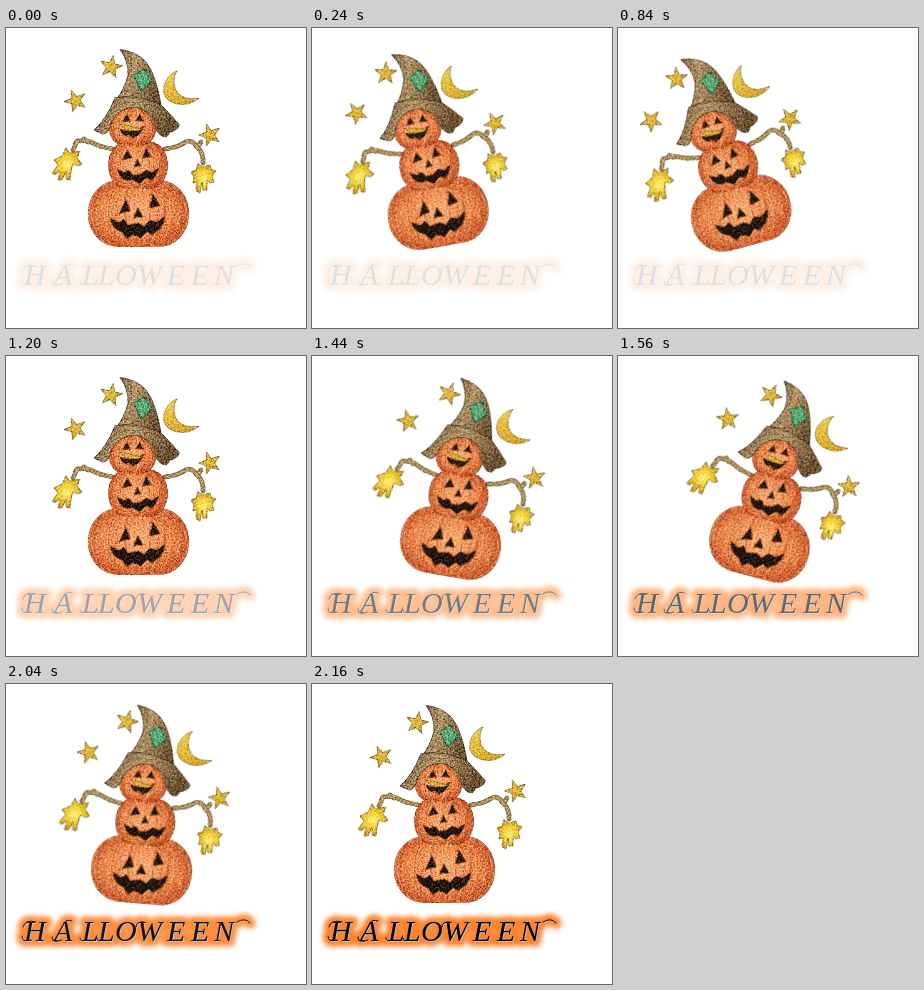
Write an HTML page that moves like this. It is 300 by 300 pixels and loops after 2280 ms.

```html
<!DOCTYPE html>
<html lang="en">
<head>
<meta charset="utf-8">
<title>Halloween</title>
<style>
html, body { margin: 0; width: 100%; height: 100%; overflow: hidden; background: #fff; }
svg { display: block; width: 100vw; height: 100vh; }
text { font: italic 30px "Liberation Serif", "Noto Serif", serif; stroke: none; }
#glow { filter: blur(2.4px); }
#glow use { stroke: #ff8128; stroke-width: 11px; }
</style>
</head>
<body>
<svg viewBox="0 0 300 300">
  <defs>
    <radialGradient id="skin" cx=".48" cy=".48" r=".58">
      <stop offset="0" stop-color="#f8b57c"/>
      <stop offset=".6" stop-color="#ec8d4e"/>
      <stop offset="1" stop-color="#c24a1c"/>
    </radialGradient>
    <linearGradient id="felt" x1="0" x2="1" y2=".3">
      <stop offset="0" stop-color="#735433"/>
      <stop offset=".45" stop-color="#b99a69"/>
      <stop offset="1" stop-color="#6d4f2d"/>
    </linearGradient>
    <linearGradient id="gold" x2="1" y2="1">
      <stop offset="0" stop-color="#f2d650"/>
      <stop offset="1" stop-color="#cf9c1e"/>
    </linearGradient>
    <radialGradient id="glove">
      <stop offset="0" stop-color="#fff08a"/>
      <stop offset=".5" stop-color="#f3d434"/>
      <stop offset="1" stop-color="#cfa01f"/>
    </radialGradient>
    <!-- crayon grain -->
    <filter id="grain" x="0" y="0" width="1" height="1" color-interpolation-filters="sRGB">
      <feTurbulence type="fractalNoise" baseFrequency=".6" numOctaves="2" seed="4"/>
      <feColorMatrix values="2 0 0 0 -.5  2 0 0 0 -.5  2 0 0 0 -.5  0 0 0 0 1"/>
      <feBlend in2="SourceGraphic" mode="soft-light"/>
      <feComposite in2="SourceAlpha" operator="in"/>
    </filter>
    <g id="letters">
      <text x="18 48 76 92 109 131 161 185 208" y="257">HALLOWEEN</text>
      <path d="M30 238Q19 235 17 243M25 256Q16 259 16 252M56 256Q46 260 46 253M66 237Q60 235 58 239M231 238Q239 233 244 239M80 256Q74 258 74 254M97 256Q91 258 91 254M138 238Q130 237 130 243" fill="none" stroke-linecap="round"/>
    </g>
  </defs>

  <g id="figure" stroke-linejoin="round" stroke-linecap="round"><g filter="url(#grain)">
    <g id="stars" fill="url(#gold)" stroke="#8d6c22" stroke-width=".9"></g>
    <path d="M171 43C163 46 156 55 158 65C161 77 181 81 193 70C181 73 172 68 169 60C167 53 168 47 171 43Z" fill="url(#gold)" stroke="#a57c1c" stroke-width=".8"/>

    <g fill="none">
      <g stroke="#715a34" stroke-width="4.8">
        <path id="arms" d="M107 121Q94 119 87 115T71 113L67 122M82 114L78 111M159 121Q170 120 178 115T191 119Q198 125 197 135M192 119L195 114"/>
      </g>
      <use href="#arms" stroke="#b8975f" stroke-width="3.2"/>
    </g>

    <g id="pumpkins"></g>

    <g fill="#21140e" stroke="#a95318" stroke-width=".8">
      <path d="M120 171L113 186L124 183ZM132 180L127 190L137 189ZM147 166L143 180L154 178Z"/>
      <path d="M104 190L113 194L118 191L122 197L132 195L138 198L144 192L151 194L159 188Q159 196 153 202L146 207L141 204L135 210L127 207L121 211L116 204Q106 202 104 190Z"/>
      <path d="M121 122L116 132L126 130ZM131 131L128 139L135 138ZM140 120L136 130L145 129Z"/>
      <path d="M111 141L118 144L123 142L127 147L135 146L140 142L146 144L153 140Q151 149 145 152L140 150L134 156L126 152L121 153Q113 150 111 141Z"/>
      <path d="M121 86L116 94L124 93ZM134 86L129 93L137 93Z"/>
      <path d="M114 101Q126 106 138 98Q135 108 127 110L123 107L119 108Q115 106 114 101Z"/>
    </g>
    <path d="M114 96L136 101Q128 105 119 101Z" fill="#e8b63a" stroke="#936022" stroke-width=".8"/>

    <g fill="url(#felt)" stroke="#4d3a22" stroke-width="1">
      <path d="M108 75Q118 62 122 48Q123 33 114 21.500Q130 23 140 34Q150 46 156 82Q132 68 108 75Z"/>
      <path d="M109 70Q131 65 156 78Q163 85 173 96Q173 102 164 104Q161 111 156 108Q149 104 147 92Q142 82 129 79Q112 80 105 95Q103 106 97 106L88 102Q100 92 109 70Z"/>
    </g>
    <path fill="none" stroke="#4d3a22" stroke-width=".8" opacity=".55" d="M124 29Q130 50 118 69M131 34Q146 52 149 73M125 57L127 69M109 76Q132 70 158 82M105 83L94 102M154 86Q162 93 163 103M148 85L154 101"/>
    <path d="M128 47L138 41L146 53L135 63Z" fill="#5fab78" stroke="#276a43" stroke-width="1.1"/>

    <g fill="url(#glove)" stroke="#96751c" stroke-width=".8">
      <path d="M60 120L64 125L74 123L71 130L76 136L72 138L67 136L65 143L64 152L60 151L60 143L56 152L52 152L54 143L49 147L46 145L52 137L48 132L56 128Z"/>
      <path d="M192 136L197 139L204 137L205 141L210 143L206 148L208 154L204 155L201 152L201 162L197 162L196 154L194 165L190 163L191 154L187 155L188 149L185 144L190 142Z"/>
    </g>
  </g></g>

  <g id="title">
    <g id="glow"><use href="#letters"/></g>
    <use href="#letters" x=".8" y=".8" fill="#b4c8d4" stroke="#b4c8d4"/>
    <use href="#letters" stroke="#000"/>
  </g>
</svg>
<script>
const STEP = 120, STEPS = 19;
const byId = id => document.getElementById(id);

let seed = 7;
const random = () => (seed = seed * 16807 % 2147483647) / 2147483647;

// Outer halo needs stroked glyphs, unlike the crisp letters.
byId('glow').innerHTML = byId('letters').outerHTML.replace(' id="letters"',
  ' stroke="#ff8128" stroke-width="11" stroke-linejoin="round"').replace('<text', '<text style="stroke:inherit"');

function star(x, y, tilt) {
  const points = Array.from({ length: 10 }, (_, i) => {
    const r = i % 2 ? 4.6 : 11.5, a = (tilt + i * 36) * Math.PI / 180;
    return [x + r * Math.sin(a), y - r * Math.cos(a)].map(v => v.toFixed(1));
  });
  return `<polygon points="${points.join(' ')}"/>`;
}

// Rib of a pumpkin; u runs from -1 (left) to 1 (right), a negative ry draws it upwards.
const rib = (x, y, rx, ry, u) =>
  `${x + u * rx * .43} ${y - ry}C${x + u * rx * 1.17} ${y - ry * .9} ` +
  `${x + u * rx * 1.17} ${y + ry * .9} ${x + u * rx * .43} ${y + ry}`;

function pumpkin(x, y, rx, ry) {
  const colors = ['#b8481a', '#ffc896', '#d0642a', '#ffb67c'];
  let out = `<path d="M${rib(x, y, rx, ry, -1)}L${rib(x, y, rx, -ry, 1)}Z" fill="url(#skin)" stroke="#a8401a"/>`;
  for (let i = 0; i < rx * 2; i++) {
    const dash = `${3 + random() * ry * .6} ${3 + random() * ry}`;
    out += `<path d="M${rib(x, y, rx, ry, random() * 2 - 1)}" stroke="${colors[i % 4]}" stroke-dasharray="${dash}" opacity=".5"/>`;
  }
  for (const u of [-.9, -.6, .55, .85])
    out += `<path d="M${rib(x, y, rx, ry, u)}" stroke="#b0421a" opacity=".5"/>`;
  return `<g fill="none" stroke-width=".8">${out}</g>`;
}

byId('stars').innerHTML = star(105, 39, 12) + star(69.5, 73, -21) + star(204, 107, -18);
byId('pumpkins').innerHTML =
  pumpkin(132.5, 185.5, 51, 33) + pumpkin(132, 137, 30, 23) + pumpkin(126.5, 98, 24, 19);

function sway(n) {
  if (n <= 5) return -5 * n;
  return n <= 14 ? 5 * n - 50 : 90 - 5 * n;
}

function draw(now) {
  const n = Math.floor(now / STEP) % STEPS;
  byId('figure').setAttribute('transform', `rotate(${sway(n)} 127 221)`);
  byId('title').setAttribute('opacity', .12 + .88 * Math.max(0, n - 7) / 11);
  requestAnimationFrame(draw);
}
draw(performance.now());
</script>
</body>
</html>
```
